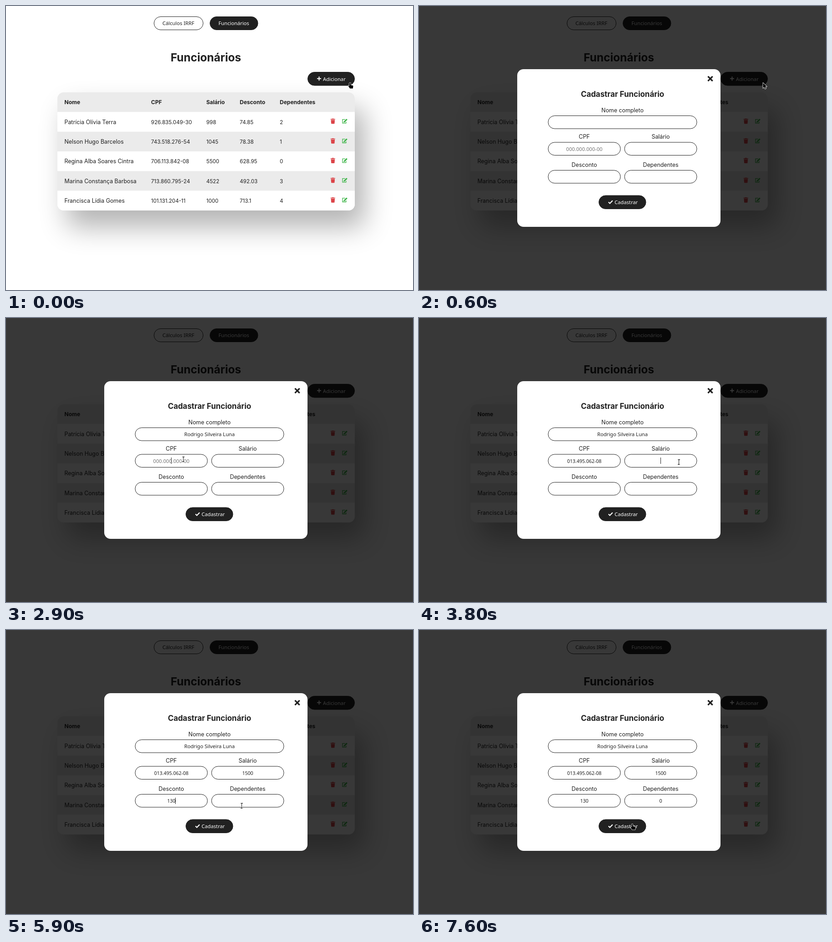
An HTML page for the animation above (8000 ms loop, 895x625 px).

```html
<!DOCTYPE html>
<html lang="pt-BR">
<head>
<meta charset="utf-8">
<title>Funcionários</title>
<style>
  html, body { margin: 0; width: 100%; height: 100%; overflow: hidden; background: #fff; }
  svg { display: block; width: 100vw; height: 100vh; }
  text { font: 12.4px Inter, sans-serif; fill: #212121; }
  .title { font-size: 24.5px; font-weight: 700; }
  .subtitle { font-size: 16.9px; font-weight: 700; }
  .head { font-size: 12px; font-weight: 700; }
  .digits { font-size: 11.6px; }
  .ui { font: 11.2px "Noto Sans", sans-serif; }
  .number { font-size: 10.6px; }
  .hint { font: 11.2px "Noto Sans", sans-serif; fill: #757575; }
  .light { fill: #fff; }
  .mid { text-anchor: middle; }
  .pill { fill: #212121; stroke: #212121; }
  .open { fill: #fff; }
  .table { width: 654px; height: 260px; margin: 190px 0 0 113px; border-radius: 14px;
           background: #fff; box-shadow: 21px 36px 60px rgba(0, 0, 0, .3); }
  .pointer path { stroke: #fff; stroke-width: 1.6; paint-order: stroke; stroke-linejoin: round; }
  .pointer #ibeam use { fill: none; stroke: #fff; stroke-width: 2.8; }
  .pointer #ibeam use + use { stroke: #111; stroke-width: 1; }
</style>
</head>
<body>
<svg viewBox="0 0 895 625">
  <defs>
    <clipPath id="round"><rect x="113" y="190" width="654" height="260" rx="14"/></clipPath>
    <g id="trash" fill="#dc4449">
      <path d="M3.2 0h3.6l.6.9H10v1.5H0V.9h2.6zM.7 3.1h8.6l-.6 7.6q-.1 1-1 1H2.3q-.9 0-1-1z"/>
    </g>
    <g id="edit">
      <path d="M7 2H1.2v8.3H9V7" fill="none" stroke="#3fb54a" stroke-width="1.3"/>
      <path d="M3.8 6.6 9.4 1q.6-.6 1.2 0l.9.9q.6.6 0 1.2L5.8 8.6l-2.3.3z" fill="#3fb54a"/>
    </g>
  </defs>

  <g id="page">
    <foreignObject width="895" height="625"><div class="table"></div></foreignObject>
    <g id="rows" clip-path="url(#round)"></g>
  </g>

  <g id="modal">
    <rect width="895" height="625" fill-opacity=".78"/>
    <rect x="216" y="139" width="447" height="347" rx="14" fill="#fff"/>
    <path d="M636.5 156l8 8m0-8l-8 8" stroke="#212121" stroke-width="3.2" stroke-linecap="square"/>
    <g id="form"></g>
    <path d="M416.7 431.5l3 3 6-6.2" fill="none" stroke="#fff" stroke-width="2.2"/>
    <rect id="caret" width="1" height="14" fill="#212121"/>
  </g>

  <g id="pointer" class="pointer">
    <g id="arrow"><path d="M0 0v11.7l2.7-2.5 1.8 4.1 2-.9-1.8-4h3.6z"/></g>
    <g id="hand"><path d="M0 0c.9 0 1.4.6 1.4 1.4V5l4 .8c1 .2 1.6.9 1.5 2l-.6 4.6H-.2l-3.4-4.8c-.6-1 .6-1.8 1.5-1l.7.7V1.4C-1.4.6-.9 0 0 0z"/></g>
    <g id="ibeam">
      <defs><polyline id="bar" points="-2.3,-5.3 2.3,-5.3 0,-5.3 0,5.3 -2.3,5.3 2.3,5.3"/></defs>
      <use href="#bar"/><use href="#bar"/>
    </g>
  </g>
</svg>
<script>
const LOOP = 8000, STEP = 100, PRESS = 500, OPEN = 600, BLINK = 500;
const byId = id => document.getElementById(id);

function add(parent, tag, attrs, content = '') {
  const el = document.createElementNS('http://www.w3.org/2000/svg', tag);
  for (const key in attrs) el.setAttribute(key, attrs[key]);
  el.textContent = content;
  return byId(parent).appendChild(el);
}
const label = (parent, x, y, content, cls = '') => add(parent, 'text', { x, y, class: cls }, content);
function pill(parent, x, y, width, height, cls = '') {
  add(parent, 'rect', { x, y, width, height, rx: height / 2, class: 'pill ' + cls });
  return (px, py) => px > x && px < x + width && py > y && py < y + height;
}

// Page
const columns = [
  ['Nome', 128.5], ['CPF', 319], ['Salário', 440.5], ['Desconto', 514], ['Dependentes', 602]
];
const staff = `
Patrícia Olívia Terra|926.835.049-30|998|74.85|2
Nelson Hugo Barcelos|743.518.276-54|1045|78.38|1
Regina Alba Soares Cintra|706.113.842-08|5500|628.95|0
Marina Constança Barbosa|713.860.795-24|4522|492.03|3
Francisca Lídia Gomes|101.131.204-11|1000|713.1|4`.trim().split('\n').map(line => line.split('|'));

[columns.map(c => c[0]), ...staff].forEach((cells, row) => {
  const height = 260 / 6, y = 190 + row * height;
  add('rows', 'rect', { x: 113, y, width: 654, height, fill: row % 2 ? '#fff' : '#ebebeb' });
  cells.forEach((cell, i) =>
    label('rows', columns[i][1], y + 26.2, cell, row ? i ? 'digits' : '' : 'head'));
  if (!row) return;
  add('rows', 'use', { href: '#trash', x: 713.8, y: y + 14.3 });
  add('rows', 'use', { href: '#edit', x: 738.8, y: y + 14.3 });
});

pill('page', 325.5, 23.5, 108, 29, 'open');
label('page', 379, 42, 'Cálculos IRRF', 'ui mid');
pill('page', 448.5, 23.5, 105.5, 29);
label('page', 501, 42, 'Funcionários', 'ui mid light');
label('page', 439.5, 122.3, 'Funcionários', 'title mid');
pill('page', 663.5, 145.5, 103, 29.5);
add('page', 'path', { d: 'M684 159.8h9m-4.5-4.5v9', stroke: '#fff', 'stroke-width': 2 });
label('page', 697, 164.5, 'Adicionar', 'ui light');

// Form: each field takes the focus, then gets its value
const fields = [
  { name: 'Nome completo', x: 284, y: 241.5, w: 327, focus: 1300, typed: 1600, value: 'Rodrigo Silveira Luna' },
  { name: 'CPF', x: 284, y: 300, w: 159, focus: 2900, typed: 3200, value: '013.495.062-08' },
  { name: 'Salário', x: 452, y: 300, w: 159, focus: 3800, typed: 4700, value: '1500' },
  { name: 'Desconto', x: 284, y: 361.5, w: 159, focus: 4900, typed: 5700, value: '130' },
  { name: 'Dependentes', x: 452, y: 361.5, w: 159, focus: 6400, typed: 6900, value: '0' }
];
label('form', 447.5, 200, 'Cadastrar Funcionário', 'subtitle mid');
for (const f of fields) {
  f.mid = f.x + f.w / 2;
  label('form', f.mid, f.y - 8, f.name, 'mid');
  f.holds = pill('form', f.x, f.y, f.w, 28.5, 'open');
  f.text = label('form', f.mid, f.y + 18.5, '', 'ui mid' + (f.value > '9' ? '' : ' number'));
}
const hint = label('form', 363.5, 318.5, '000.000.000-00', 'hint mid');
const onSubmit = pill('form', 395.5, 417, 103.5, 29.5);
label('form', 430, 436, 'Cadastrar', 'ui light');

// Pointer moves: eased, with an optional downward bow
const moves = [
  { from: 700, to: 1300, x: 533, y: 256 },
  { from: 1500, to: 2250, x: 390, y: 311 },
  { from: 3100, to: 3800, x: 571.5, y: 317, bow: 20 },
  { from: 4600, to: 5100, x: 385, y: 377 },
  { from: 5600, to: 6050, x: 565, y: 376, bow: 12 },
  { from: 6800, to: 7600, x: 469, y: 427 }
];

function pointAt(t) {
  let x = 756.5, y = 169;
  for (const move of moves) {
    const k = Math.min(1, Math.max(0, (t - move.from) / (move.to - move.from)));
    const ease = k * k * (3 - 2 * k);
    x += (move.x - x) * ease;
    y += (move.y - y) * ease + (move.bow || 0) * Math.sin(Math.PI * k);
    if (k < 1) break;
  }
  return [x, y];
}

function shapeAt(t, x, y) {
  if (t < OPEN) return t < PRESS ? 'hand' : 'arrow';
  if (onSubmit(x, y)) return 'hand';
  return fields.some(f => f.holds(x, y)) ? 'ibeam' : 'arrow';
}

const show = (el, on) => el.setAttribute('visibility', on ? 'inherit' : 'hidden');

function drawCaret(t) {
  const f = fields.findLast(field => field.focus <= t), caret = byId('caret');
  const since = f && t - (t < f.typed ? f.focus : f.typed);
  show(caret, f && since % (2 * BLINK) < BLINK);
  if (!f) return;
  caret.setAttribute('x', Math.round(f.mid + f.text.getComputedTextLength() / 2 - .1));
  caret.setAttribute('y', Math.round(f.y + 7.4));
}

function draw(t) {
  show(byId('modal'), t >= OPEN);
  show(hint, t < fields[1].typed);
  for (const f of fields) f.text.textContent = t < f.typed ? '' : f.value;
  drawCaret(t);

  const [x, y] = pointAt(t), shape = shapeAt(t, x, y);
  byId('pointer').setAttribute('transform', `translate(${x} ${y})`);
  for (const id of ['arrow', 'hand', 'ibeam']) show(byId(id), id === shape);
}

const start = performance.now();
let last = -1;
function tick() {
  const t = Math.floor((performance.now() - start) % LOOP / STEP) * STEP;
  if (t !== last) draw(last = t);
  requestAnimationFrame(tick);
}
tick();
</script>
</body>
</html>
```
